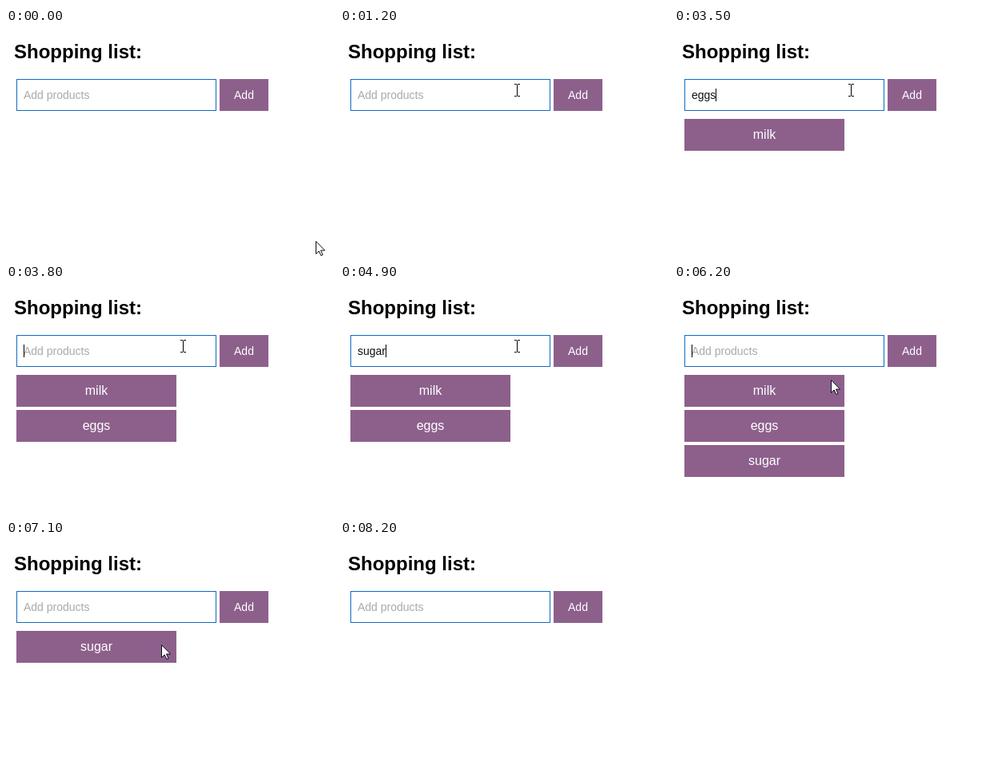
An HTML page that plays this animation: 410 px wide and 286 px high, repeating every 8700 ms.

```html
<!DOCTYPE html>
<html lang="en">
<head>
<meta charset="utf-8">
<title>Shopping list</title>
<style>
  html, body { margin: 0; width: 100%; height: 100%; overflow: hidden; background: #fff; }
  body { position: relative; font: 14px/16px "Liberation Sans", Arial, sans-serif; cursor: default; }
  h2, div, span, svg { position: absolute; margin: 0; white-space: pre; }
  h2 { left: 10px; top: 16px; font-size: 24px; line-height: 27px; color: #000; }
  #field { left: 13px; top: 64px; width: 248px; height: 38px; border: 1px solid #0d6cc4; background: #fff; }
  #text { left: 22px; top: 76px; color: #111; }
  #text.empty { color: #a9a9a9; }
  #caret { top: 76px; width: 1px; height: 16px; background: #000; }
  #add, .item { background: #8d608c; color: #fff; text-align: center; }
  #add { left: 267px; top: 64px; width: 61px; height: 28px; padding-top: 12px; }
  .item { left: 13px; width: 200px; height: 29px; padding-top: 11px; font-size: 16px; line-height: 17px; }
  svg { left: 0; top: 0; overflow: visible; }
</style>
</head>
<body>
<h2>Shopping list:</h2>
<div id="field"></div>
<span id="text"></span>
<div id="caret"></div>
<div id="add">Add</div>
<div class="item"></div>
<div class="item"></div>
<div class="item"></div>
<svg id="arrow" width="12" height="19"><path d="M.5 .7V16.4L4.2 12.9 6.8 18.5 9 17.5 6.5 12H11.6Z" fill="#fff" stroke="#0b0b18"/></svg>
<svg id="beam" width="7" height="16" shape-rendering="crispEdges"><path d="M0 0h3v1h-3zM4 0h3v1h-3zM3 1h1v14h-1zM0 15h3v1h-3zM4 15h3v1h-3z"/></svg>
<script>
const LOOP = 8700;
const $ = id => document.getElementById(id);
const rows = [...document.querySelectorAll('.item')];

// time, x, y, shape
const pointer = [
  [0, 387, 267, 'arrow'], [100, 380, 255, 'arrow'], [200, 350, 212, 'arrow'],
  [300, 300, 152, 'arrow'], [400, 248, 108, 'arrow'], [500, 220, 78, 'beam'],
  [700, 219, 74, 'beam'], [800, 218, 70, 'beam'], [6000, 214, 78, 'beam'],
  [6100, 203, 106, 'arrow'], [6200, 196, 120, 'arrow'], [6300, 195, 125, 'arrow'],
  [6400, 194, 128, 'arrow'], [6500, 194, 131, 'arrow'], [7800, 192, 142, 'arrow'],
  [7900, 190, 170, 'arrow'], [8000, 189, 210, 'arrow'], [8100, 188, 255, 'arrow'],
  [8200, 0, 0, '']
];

// when each letter is typed, when the word is added and when it is removed
const words = [
  { name: 'milk', keys: [1500, 1600, 1800, 1900], added: 2300, removed: 6600 },
  { name: 'eggs', keys: [2800, 3000, 3200, 3500], added: 3800, removed: 7100 },
  { name: 'sugar', keys: [4200, 4300, 4600, 4800, 4900], added: 5200, removed: 7700 }
];
const focusAt = 700, blurAt = 6600;
const presses = [focusAt, ...words.flatMap(w => [...w.keys, w.added])];

const lastBefore = (list, t) => list.filter(v => v <= t).pop();
const show = (el, on) => { el.style.visibility = on ? 'visible' : 'hidden'; };

function drawField(t) {
  const word = words.find(w => t >= w.keys[0] && t < w.added);
  const typed = word ? word.name.slice(0, word.keys.filter(k => k <= t).length) : '';
  const text = $('text');
  text.textContent = typed || 'Add products';
  text.className = typed ? '' : 'empty';

  const since = t - lastBefore(presses, t);
  show($('caret'), t >= focusAt && t < blurAt && since % 1000 < 500);
  const width = typed ? text.getBoundingClientRect().width : 0;
  $('caret').style.left = 22 + Math.round(width) + 'px';
}

function drawList(t) {
  const list = words.filter(w => t >= w.added && t < w.removed);
  rows.forEach((row, i) => {
    row.style.top = 114 + 44 * i + 'px';
    row.textContent = list[i] ? list[i].name : '';
    show(row, i < list.length);
  });
}

function drawPointer(t) {
  const [, x, y, shape] = pointer.filter(p => p[0] <= t).pop();
  for (const id of ['arrow', 'beam']) {
    show($(id), id === shape);
    $(id).style.left = x + 'px';
    $(id).style.top = y + 'px';
  }
}

function draw(t) {
  drawField(t);
  drawList(t);
  drawPointer(t);
}

const start = performance.now();
function tick() {
  draw((performance.now() - start) % LOOP);
  requestAnimationFrame(tick);
}
draw(0);
requestAnimationFrame(tick);
</script>
</body>
</html>
```
